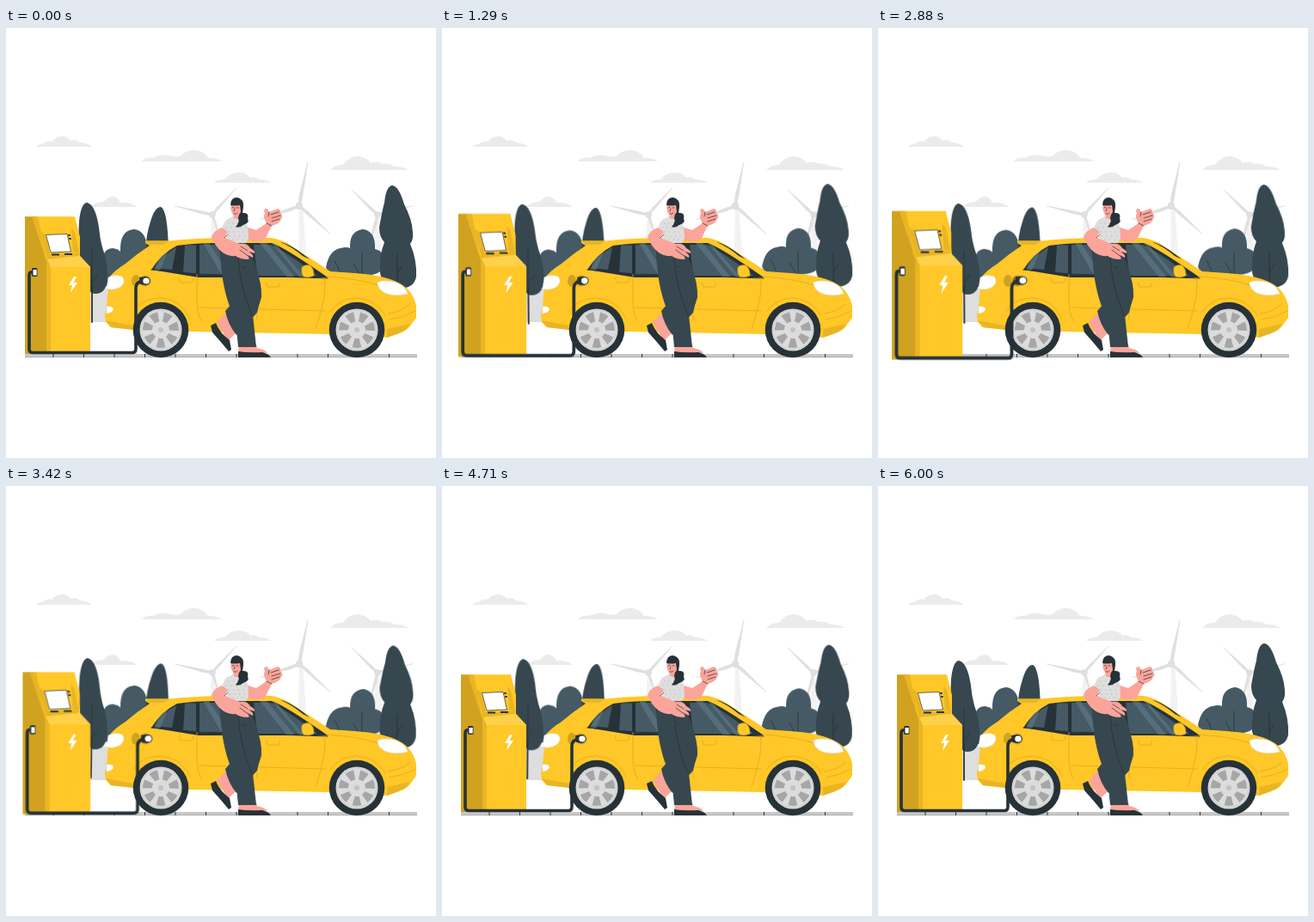
An HTML page without scripts for the animation above (6040 ms loop, 500 by 500 pixels).

```html
<!DOCTYPE html>
<html lang="en">
<head>
<meta charset="utf-8">
<title>Charging stop</title>
<style>
html, body { margin: 0; width: 100%; height: 100%; overflow: hidden; background: #fff; }
svg { display: block; width: 100%; height: 100%; }
.sway { transform-origin: 281px 263px; animation: sway 6.04s linear infinite; }
.pulse { transform-origin: 95px 299px; animation: pulse 6.04s cubic-bezier(.37, 0, .63, 1) infinite; }
@keyframes sway {
  0%, 99.34%, 100% { transform: rotate(0deg); }
  6.21%, 31.04%, 55.88%, 80.71% { transform: rotate(1deg); }
  18.63%, 43.46%, 68.29%, 93.13% { transform: rotate(-1deg); }
}
@keyframes pulse {
  0%, 30.8%, 41%, 62%, 100% { transform: scale(1); }
  10.9%, 49.5% { transform: scale(1.09); }
}
.y { fill: #ffc727; }
.y2 { fill: #e9b524; }
.y3 { fill: #d0a220; }
.ink { fill: #263238; }
.slate { fill: #37474f; }
.bush { fill: #455a64; }
.skin { fill: #fba49a; }
.w { fill: #fff; }
.line { fill: none; stroke: #263238; stroke-linecap: round; stroke-linejoin: round; }
.seam { fill: none; stroke: #d9a61f; stroke-width: .7; }
</style>
</head>
<body>
<svg viewBox="0 0 500 500">
  <defs>
    <g id="wheel">
      <circle class="ink" r="32.3"/>
      <circle r="24.5" fill="#dcdcdc"/>
      <circle r="15.5" fill="none" stroke="#a6a6a6" stroke-width="11" pathLength="7" stroke-dasharray=".58 .42" transform="rotate(-79)"/>
      <circle r="23" fill="none" stroke="#c7c7c7" stroke-width=".8"/>
      <circle r="8" fill="#dcdcdc"/>
      <circle r="3" fill="#c2c2c2"/>
    </g>
    <path id="blade" d="M-1.2 0L-2.2 -12L0 -50L1.500 -12L1.200 0Z"/>
    <clipPath id="glass"><path d="M169 281Q181 262 199 253Q220 250 245 250H309Q324 255 374 290H224Z"/></clipPath>
  </defs>

  <g fill="#ebebeb">
    <path d="M35 138Q38 135 43 135Q47 131 53 132Q58 126 65 126Q72 126 75 131Q82 129 86 133Q95 134 100 138Z"/>
    <path d="M158 155Q162 150 171 151Q179 147 188 148Q196 151 203 149Q209 142 219 142Q229 142 235 151Q246 151 251 155Z"/>
    <path d="M242 180Q246 176 254 176Q261 168 271 168Q280 168 284 174Q290 172 294 176Q304 176 308 180Z"/>
    <path d="M377 165Q382 159 392 159Q399 149 409 149Q419 150 424 157Q432 154 438 158Q446 157 451 161Q463 161 468 165Z"/>
    <path d="M98 208L102 205Q107 202 114 202Q118 196 124 196Q130 197 133 203Q147 203 152 208Z"/>
  </g>

  <path fill="#f2f2f2" d="M239 217H242L245 252H237ZM341 207H345L349 262H340ZM430 216H434L437 265H428Z"/>
  <g fill="#e0e0e0" stroke="#d4d4d4" stroke-width=".4">
    <g transform="translate(240 217)">
      <use href="#blade" transform="rotate(-77) scale(.9)"/>
      <use href="#blade" transform="rotate(42) scale(.84)"/>
      <use href="#blade" transform="rotate(163) scale(.7)"/>
      <circle r="3.500"/>
    </g>
    <g transform="translate(341 207)">
      <use href="#blade" transform="rotate(11) scale(1.04)"/>
      <use href="#blade" transform="rotate(132) scale(.97)"/>
      <use href="#blade" transform="rotate(-109) scale(.97)"/>
      <circle r="4"/>
    </g>
    <g transform="translate(432 217)">
      <use href="#blade" transform="rotate(-46) scale(.85)"/>
      <use href="#blade" transform="rotate(76) scale(.85)"/>
      <use href="#blade" transform="rotate(195) scale(.85)"/>
      <circle r="3.500"/>
    </g>
  </g>

  <path fill="#dedede" d="M97 303H119V342H97Z"/>

  <g class="sway">
    <path class="bush" d="M110 300Q108 282 113 274Q111 257 124 256Q131 257 133 260Q132 235 149 234Q164 236 164 258V300Z"/>
    <path class="slate" d="M162 260Q163 240 168 225Q173 208 180 208Q188 211 189 260Z"/>
    <path class="slate" d="M94 203Q104 205 108 232Q109 244 112 255Q119 274 118 293Q116 309 104 309Q94 309 90 290Q83 260 85 225Q87 204 94 203Z"/>
    <path class="line" stroke-width="1.800" d="M100 300V342"/>
    <path class="line" stroke-width=".8" d="M100 258V300M100 296L107 286"/>
    <path class="bush" d="M372 278Q376 258 389 256Q396 254 400 256Q399 236 415 234Q430 236 429 257Q442 260 441 276Q436 288 415 288H376Z"/>
    <path class="line" stroke-width=".8" d="M414 286V262M388 284Q386 276 382 271M411 286L404 274"/>
    <path class="slate" d="M440 203Q442 184 449 183Q457 184 463 205Q472 222 473 237Q474 246 470 251Q478 270 477 289Q475 303 456 303Q438 303 435 285Q434 264 440 249Q434 243 434 232Q437 214 440 203Z"/>
    <path class="line" stroke-width="1" d="M455 302V263M455 285L461 276"/>
  </g>

  <path fill="#c7c7c7" d="M22 379H478V383H22Z"/>
  <path fill="#a6a6a6" d="M22 382.400H478V383.200H22Z"/>
  <path fill="none" stroke="#263238" stroke-width="4" stroke-dasharray="1 34.500" d="M54.500 381H478"/>

  <g>
    <path class="y" d="M162 247.500H190Q215 244.500 250 244H309Q321 246 333 254L377 283L405 285Q440 287 458 297Q473 305 477 323V337L471 345Q467 352 457 355L443 360L376 356L214 353L150 351L122 348L116 342L115 334L117 324L120 290Q126 282 139 274Q153 262 167 253L162 250Z"/>
    <path class="y2" d="M162 247.500H190L183 252H167ZM116 340L148 346V351L122 348ZM443 350L470 344Q465 352 457 355L443 360Z"/>
    <path class="ink" d="M319 249Q331 251 353 269L345 265Q332 254 319 249Z"/>
    <path class="ink" d="M169 281Q181 262 199 253Q220 250 245 250H309Q324 255 374 290H224Z"/>
    <g clip-path="url(#glass)">
      <path class="bush" d="M173 279Q184 262 198 255L193 281ZM208 252.500H221V285H206ZM225 252H248L252 287H225ZM288 252H308Q326 260 362 288L292 288Z"/>
      <path d="M184 253H191L178 284H171ZM229 250H236L260 287H251ZM295 250H303L336 290H327ZM309 250H313L347 290H342Z" fill="#607d8b" opacity=".6"/>
    </g>
    <path class="line" stroke-width="1.200" d="M169 281L224 286L374 291"/>
    <path class="seam" d="M222 286V317Q222 333 228 341M290 289L292 340M370 291Q374 308 360 350M148 330Q157 314 180 314Q203 315 214 338M224 325L371 329M374 289Q412 292 433 299M377 330Q389 314 408 314Q429 315 441 334M201 290L203 296H216L218 291M302 295L304 301H317L319 296"/>
    <path class="y" d="M344 279Q346 275 353 276Q358 279 358 288Q352 291 346 289Q343 286 344 279Z" stroke="#d9a61f" stroke-width=".8"/>
    <path class="w" d="M119 290Q127 286 135 289Q140 295 133 301Q125 306 117 303ZM117 324Q124 323 125 327Q124 331 117 332Z" stroke="#e0e0e0" stroke-width=".5"/>
    <path class="w" d="M432 296Q439 292 454 296Q465 301 467 309Q452 313 440 308Q432 303 432 296Z" stroke="#e0e0e0" stroke-width=".7"/>
    <path class="seam" d="M446 339Q461 337 476 329M444 332Q460 330 470 321"/>
    <use href="#wheel" x="180" y="351"/>
    <use href="#wheel" x="408" y="351"/>
    <ellipse class="y3" cx="151" cy="294" rx="5" ry="7"/>
    <circle class="y2" cx="162" cy="294" r="7"/>
    <circle cx="162" cy="294" r="5.500" fill="#8c6d15"/>
  </g>

  <g class="pulse">
    <path class="y3" d="M22 219.300H34L47 270L52 276V379H22Z"/>
    <path class="y2" d="M30 219.300H38L50 268L53 277V379H47V272L38 244Z"/>
    <path class="y" d="M37 219.300H80L86 243V265L98 278V379H52V277L46 265Z"/>
    <path class="y2" d="M40 236L46 240L51 263L85 262V265L48 269ZM76 233L80 237L85 262L78 261Z"/>
    <path fill="#ffd14a" d="M48 269L86 265L98 278H52Z"/>
    <path class="w" d="M46.500 240.500L71 239.500L75.500 260L52 261Z" stroke="#263238" stroke-width=".7"/>
    <path class="ink" d="M72 240H74.500L75 242H72.500ZM73 244H75.500L76 246H73.500ZM53 262.500H62V264.500H53ZM68 262H77V264H68Z"/>
    <path class="w" d="M79 289L73 299H77L75 308L83 296H78.500L82 289Z"/>
    <path class="line" stroke-width="3.600" d="M33 284H29Q27 284 27 288V373Q27 377.500 31 377.500H147Q151 377.500 151 373V302Q151 295 160 294"/>
    <rect class="ink" x="30" y="279" width="6.500" height="10" rx="1.500"/>
    <rect class="w" x="31.500" y="281" width="4.200" height="6.500"/>
    <path class="ink" d="M155 290L163 289V299L156 298Z"/>
    <ellipse class="w" cx="163" cy="294" rx="4.200" ry="4" stroke="#263238" stroke-width="1"/>
  </g>

  <g>
    <path class="skin" d="M258 329L245 342L258 364L269 353Z"/>
    <path class="ink" d="M238 346L244 343Q248 354 260 363L262 374L259 376Q250 365 240 354Z"/>
    <path class="slate" d="M268 314L255 329Q258 345 268 357L292 331L297 310Z"/>
    <path class="skin" d="M271 368H291L292 372Q302 374 304 378H270Z"/>
    <path class="ink" d="M270 376Q281 378 298 377Q306 379 308 383H270Z"/>
    <path class="slate" d="M254 250H279L290 276Q298 299 297 313Q294 325 287 334L291 371H270Q268 343 261 326Q251 301 249 263Z"/>
    <path class="line" stroke-width=".8" d="M270 267Q272 302 286 334M274 277L278 279"/>
    <path class="skin" d="M278 231L291 235L303 227Q298 219 301 216L300 212Q303 207 306 214L316 210Q320 211 319 215Q323 219 320 222Q318 228 309 230L301 246Q291 251 281 246Z"/>
    <path class="line" stroke-width=".7" d="M306 214L305 219M308 217L317 214M309 221L319 218M309 225L318 222M303 227L309 230"/>
    <path d="M264 219L256 223Q252 228 251 235L257 239L255 250H279L282 245L281 230L275 220Z" fill="#dedede"/>
    <path fill="none" stroke="#a6a6a6" stroke-width=".9" stroke-dasharray="1 4.500" d="M258 227H278M256 232H279M259 237H280M260 242H280M258 246H279"/>
    <path class="skin" d="M251 232L258 237L254 244L272 251Q281 250 284 256Q290 259 289 262L282 260Q289 264 287 267L279 263Q284 267 282 269Q272 269 267 265Q250 267 239 244Q240 236 251 232Z"/>
    <path class="line" stroke-width=".7" d="M273 254L281 259M272 258L280 264M254 244L258 240"/>
    <path class="skin" d="M262 203Q260 212 264 217L265 221Q269 224 274 220L276 206L270 201Z"/>
    <path class="ink" d="M261 206Q261 197 269 197Q277 199 276 208L275 215Q283 214 281 222Q284 226 276 229Q271 233 267 231Q272 226 270 221Q270 217 273 214L272 206Q266 207 261 206Z"/>
    <path class="line" stroke-width=".7" d="M263 209L265 208.500M268 209L270 209M266 210L265 213M265 216Q268 217 269 215"/>
  </g>
</svg>
</body>
</html>
```
